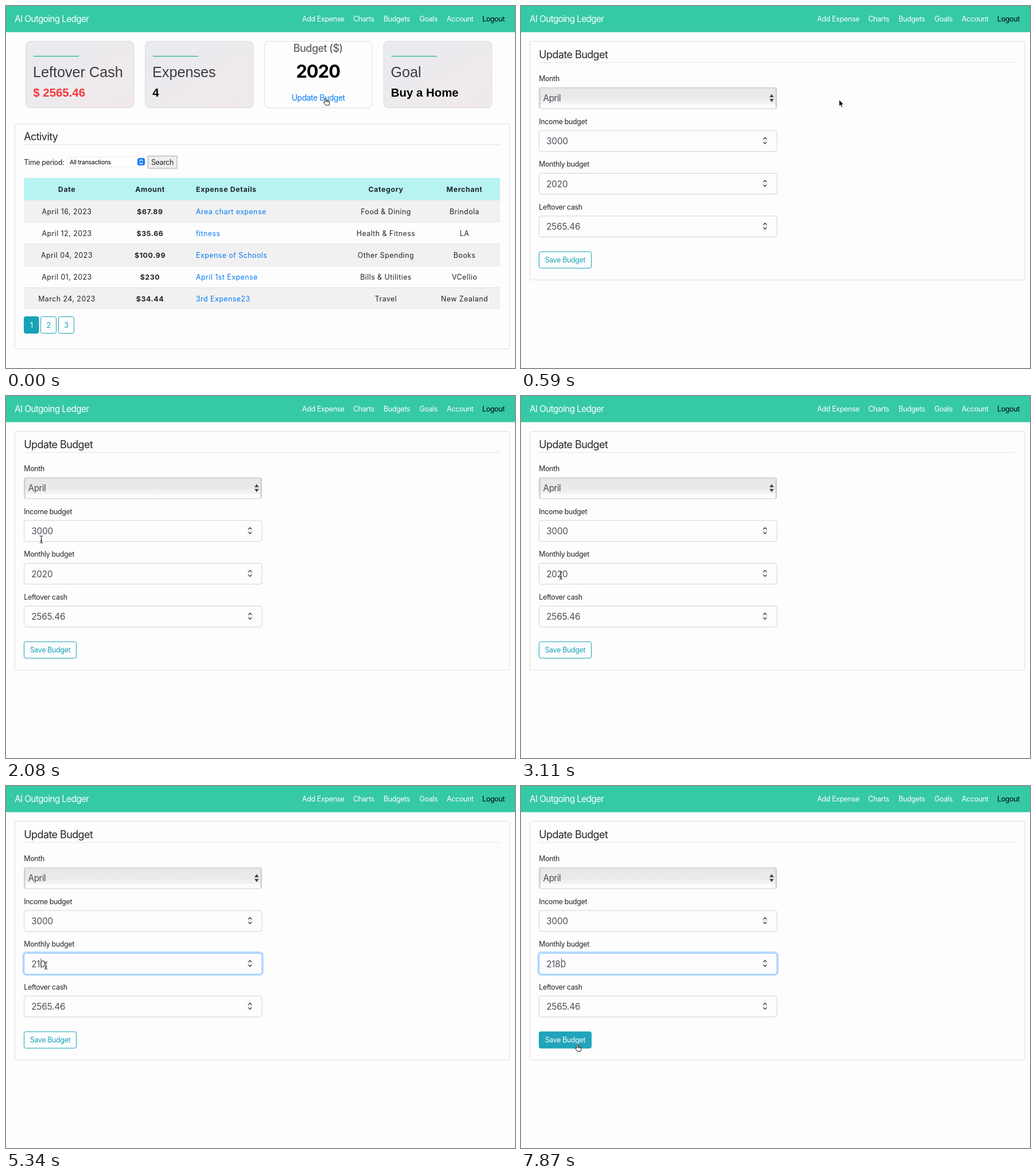
Recreate the animation shown at these times as an HTML page. Size 887 by 631 pixels, loop 8 s.

```html
<!DOCTYPE html>
<html lang="en">
<head>
<meta charset="utf-8">
<title>AI Outgoing Ledger</title>
<style>
html, body { margin: 0; width: 100%; height: 100%; overflow: hidden; background: #fdfdfd; }
svg { display: block; }
text { font: 400 12.4px Inter, "Open Sans", sans-serif; letter-spacing: -.026em; fill: #212529; white-space: pre; }
.mid { text-anchor: middle; }
.brand { font-size: 15.3px; letter-spacing: -.04em; fill: #fff; }
.nav { fill: #fff; }
.black { fill: #000; }
.head { font-size: 18px; letter-spacing: -.033em; }
.card { font: 400 25.2px "Liberation Sans", Arial, sans-serif; letter-spacing: 0; fill: #3b3b40; }
.value { font: 700 20.4px "Liberation Sans", Arial, sans-serif; letter-spacing: 0; fill: #000; }
.red { fill: #f23a3c; }
.label { font-size: 18px; font-weight: 500; letter-spacing: -.03em; fill: #616165; }
.big { font-size: 30.8px; font-weight: 700; letter-spacing: -.03em; fill: #000; }
.link { font-size: 13.9px; letter-spacing: -.03em; fill: #087bf5; }
.link.over { fill: #0056b3; text-decoration: underline; }
.small { font-size: 10.5px; fill: #000; }
.cell { letter-spacing: .47px; }
.bold { font-weight: 700; letter-spacing: .6px; }
.blue { fill: #087bf5; }
.teal { fill: #17a2b8; }
.white { fill: #fff; }
.num { font-size: 15.3px; letter-spacing: -.012em; fill: #495057; }
.pick { font-size: 15.3px; letter-spacing: -.033em; fill: #495057; }
</style>
</head>
<body>
<svg id="stage" width="887" height="631" viewBox="0 0 887 631">
  <defs>
    <linearGradient id="tile" x1="0" y1="0" x2="1" y2="1">
      <stop offset="0" stop-color="#e9ebef"/><stop offset="1" stop-color="#f1e9eb"/>
    </linearGradient>
    <linearGradient id="select" x1="0" y1="0" x2="0" y2="1">
      <stop offset="0" stop-color="#dedede"/><stop offset=".1" stop-color="#e8e8e8"/>
      <stop offset=".56" stop-color="#eaeaea"/><stop offset=".57" stop-color="#efefef"/>
      <stop offset=".76" stop-color="#f2f2f2"/><stop offset=".78" stop-color="#fbfbfb"/>
      <stop offset="1" stop-color="#fdfdfd"/>
    </linearGradient>
  </defs>
  <g id="top"></g>
  <g id="home"></g>
  <g id="form"></g>
  <path id="arrow" d="M0 0V11.6L2.6 9.2 4.3 13.2 6.2 12.4 4.5 8.5H8Z" fill="#000" stroke="#fff" stroke-width=".8"/>
  <path id="hand" d="M-1.2 8V1.2a1.1 1.1 0 0 1 2.2 0V5.2Q2 4 3 5.5 4.2 4.6 5 6 6.6 5.4 6.9 7V9.6L5.8 13H.5L-3.6 8.4Q-4 6.9-2.6 7ZM1 5.2V7.5M3 5.5V7.7M5 6V7.9" fill="#fff" stroke="#111" stroke-width=".95" stroke-linejoin="round"/>
  <path id="beam" d="M-2.7-6.3Q0-6.3 0-4.6 0-6.3 2.7-6.3M0-4.8V4.8M-2.7 6.3Q0 6.3 0 4.6 0 6.3 2.7 6.3M-1.6 2.4H1.6" fill="none" stroke="#222" stroke-width="1.1"/>
</svg>
<script>
const $ = id => document.getElementById(id);
const text = (x, y, s, cls = '', id = '') =>
  `<text x="${x}" y="${y}" class="${cls}" id="${id}">${s.replace(/&/g, '&amp;')}</text>`;
const box = (x, y, w, h, fill, stroke = 'none', r = 0, more = '') =>
  `<rect x="${x}" y="${y}" width="${w}" height="${h}" rx="${r}" fill="${fill}" stroke="${stroke}" ${more}/>`;
const lines = (d, stroke, width = 1) =>
  `<path d="${d}" fill="none" stroke="${stroke}" stroke-width="${width}" stroke-linecap="round" stroke-linejoin="round"/>`;
const rule = y => box(31, y, 830, 1, '#e4e4e4');

function topBar() {
  const items = [[516, 'Add Expense'], [605, 'Charts'], [658, 'Budgets'], [720.5, 'Goals'], [768, 'Account'], [830, 'Logout']];
  return box(0, 0, 887, 45.6, '#36c9a6') + text(15, 28, 'AI Outgoing Ledger', 'brand') +
    items.map(([x, s]) => text(x, 27.2, s, s === 'Logout' ? 'black' : 'nav')).join('');
}

function tile(x, title, value, cls = '') {
  return box(x, 61.5, 188.5, 116, 'url(#tile)', '#d9d9dc', 8) +
    box(x + 13.5, 86.8, 79, 1.6, '#3dbfa3') +
    text(x + 12.5, 124.3, title, 'card') + text(x + 12.8, 158.3, value, 'value ' + cls);
}

function table() {
  const cols = [106, 251, 331, 662, 799];
  const rows = [
    ['April 16, 2023', '$67.89', 'Area chart expense', 'Food & Dining', 'Brindola'],
    ['April 12, 2023', '$35.66', 'fitness', 'Health & Fitness', 'LA'],
    ['April 04, 2023', '$100.99', 'Expense of Schools', 'Other Spending', 'Books'],
    ['April 01, 2023', '$230', 'April 1st Expense', 'Bills & Utilities', 'VCellio'],
    ['March 24, 2023', '$34.44', '3rd Expense23', 'Travel', 'New Zealand']
  ];
  const anchor = i => i === 2 ? '' : ' mid';
  const head = ['Date', 'Amount', 'Expense Details', 'Category', 'Merchant'];
  let out = box(31.5, 299.7, 829.5, 38.8, '#b6f3f2') +
    head.map((s, i) => text(cols[i], 323.8, s, 'bold' + anchor(i))).join('');
  rows.forEach((row, n) => {
    const y = 338.5 + n * 38;
    out += box(31.5, y, 829.5, 38, n % 2 ? '#fdfdfd' : '#f1f1f1') + box(31.5, y, 829.5, 1, '#dee2e6');
    out += row.map((s, i) =>
      text(cols[i], y + 24, s, (i === 1 ? 'bold' : 'cell') + (i === 2 ? ' blue' : '') + anchor(i))).join('');
  });
  return out;
}

function home() {
  const pages = [[31.5, 25.5], [60.5, 27], [91.5, 27]].map(([x, w], i) =>
    box(x, 541.5, w, 29, i ? '#fdfdfd' : '#17a2b8', '#17a2b8', 3) +
    text(x + w / 2, 560.5, String(i + 1), 'mid ' + (i ? 'teal' : 'white'))).join('');
  return tile(34.5, 'Leftover Cash', '$ 2565.46', 'red') + tile(242.5, 'Expenses', '4') +
    box(450.5, 61.5, 187.5, 116, '#fdfdfd', '#dcdcdf', 8) + tile(658, 'Goal', 'Buy a Home') +
    text(543.7, 80, 'Budget ($)', 'label mid') + text(543.7, 125.2, '2020', 'big mid') +
    text(544.2, 164.5, 'Update Budget', 'link mid', 'link') +
    box(15.5, 205.5, 862, 392, '#fdfdfd', '#dfdfdf', 2) + text(31.3, 234.3, 'Activity', 'head') + rule(241) +
    text(31.3, 276.5, 'Time period:') +
    box(106, 263.5, 137, 17, '#fff', '#ededed', 4) + text(111, 276.3, 'All transactions', 'small') +
    box(229, 265, 13, 13, '#1a7df5', 'none', 3.5) +
    lines('M233 270L235.5 267.7 238 270M233 273.2L235.5 275.5 238 273.2', '#fff', 1.3) +
    box(247.5, 261.5, 50.5, 21.5, '#efefef', '#a8a8a8') + text(272.5, 276.5, 'Search', 'mid') +
    table() + pages;
}

function field(y, label, value, id) {
  return text(31.3, y - 11.1, label) +
    box(31.5, y, 414.5, 36.5, '#fdfdfd', '#ced4da', 4, `id="${id}Box"`) +
    text(44.2, y + 24.1, value, 'num', id) +
    box(420, y + 10, 10.5, 15.5, '#f7f7f7', 'none', 4) + box(420.5, y + 17.3, 9.5, .8, '#d8d8d8') +
    lines(`M422.7 ${y + 15}L425.2 ${y + 12.4} 427.7 ${y + 15}M422.7 ${y + 20.4}L425.2 ${y + 23} 427.7 ${y + 20.4}`, '#333', 1.3);
}

function form() {
  return box(15.5, 61.5, 862, 416, '#fdfdfd', '#dfdfdf', 2) + text(31.3, 90.8, 'Update Budget', 'head') + rule(97.8) +
    text(31.3, 131.2, 'Month') + box(31.5, 142.3, 414, 36.7, 'url(#select)', '#c9c9c9', 3) +
    box(32.5, 143, 1.5, 35, '#cfcfcf') + box(443.3, 143, 1.5, 35, '#cfcfcf') +
    text(38.6, 166, 'April', 'pick') +
    '<path d="M433 159L436.8 153.5 440.6 159ZM433 162L436.8 167.5 440.6 162Z" fill="#444"/>' +
    box(30, 289.8, 417.5, 39.5, 'none', '#bfdeff', 5.5, 'id="glow" stroke-width="3"') +
    field(217, 'Income budget', '3000', 'income') +
    field(291.5, 'Monthly budget', '2020', 'monthly') +
    field(366, 'Leftover cash', '2565.46', 'cash') +
    box(0, 300.5, 1, 17, '#555', 'none', 0, 'id="caret"') +
    box(31.5, 428.3, 91, 28.7, '#fdfdfd', '#17a2b8', 3, 'id="save"') +
    text(77, 447, 'Save Budget', 'mid teal', 'saveText');
}

$('top').innerHTML = topBar();
$('home').innerHTML = home();
$('form').innerHTML = form();

// time, pointer, x, y
const moves = [
  [0, 'hand', 557, 160], [140, 'hand', 556, 163], [290, 'hand', 555.3, 165],
  [590, 'arrow', 554.3, 163.3], [890, 'arrow', 512, 174], [1040, 'arrow', 450, 222],
  [1190, 'beam', 276, 238], [1340, 'beam', 88, 251],
  [1640, 'beam', 80, 240], [1790, 'beam', 72, 231], [1930, 'beam', 65, 238], [2080, 'beam', 61.5, 250],
  [2230, 'arrow', 60, 262], [2380, 'arrow', 58, 276], [2510, 'beam', 58, 298], [2660, 'beam', 59, 309],
  [2810, 'beam', 60, 312], [2960, 'beam', 66, 315], [3110, 'beam', 69.6, 313],
  [7430, 'beam', 73, 324], [7580, 'beam', 85, 376], [7720, 'hand', 96, 439], [7870, 'hand', 98, 449.5]
];
// time, value, caret x (0 hides it)
const typing = [
  [0, '2020', 0], [3400, '2020', 71.6], [3850, '2020', 0], [4300, '2020', 71.6],
  [4750, '200', 62.8], [5050, '20', 53.4], [5340, '210', 60.4], [5640, '2180', 70],
  [6080, '2180', 0], [6680, '2180', 70], [7130, '2180', 0], [7580, '2180', 70]
];
const LOOP = 8000;
const at = (steps, t) => steps.findLast(s => s[0] <= t);
const show = (id, on) => $(id).style.display = on ? '' : 'none';

function draw(t) {
  show('home', t < 590);
  show('form', t >= 590);
  $('link').classList.toggle('over', t >= 140);

  const [, pointer, x, y] = at(moves, t);
  for (const id of ['arrow', 'hand', 'beam']) show(id, id === pointer);
  $(pointer).setAttribute('transform', `translate(${x} ${y})`);

  const [, value, caret] = at(typing, t);
  $('monthly').textContent = value;
  show('caret', caret);
  $('caret').setAttribute('x', caret);

  const focus = t >= 3400;
  show('glow', focus);
  $('monthlyBox').setAttribute('stroke', focus ? '#80bdff' : '#ced4da');

  const over = t >= 7870;
  $('save').setAttribute('fill', over ? '#21a4ba' : '#fdfdfd');
  $('saveText').setAttribute('class', over ? 'mid white' : 'mid teal');
}

const start = performance.now();
function tick() {
  draw((performance.now() - start) % LOOP);
  requestAnimationFrame(tick);
}
tick();
</script>
</body>
</html>
```
